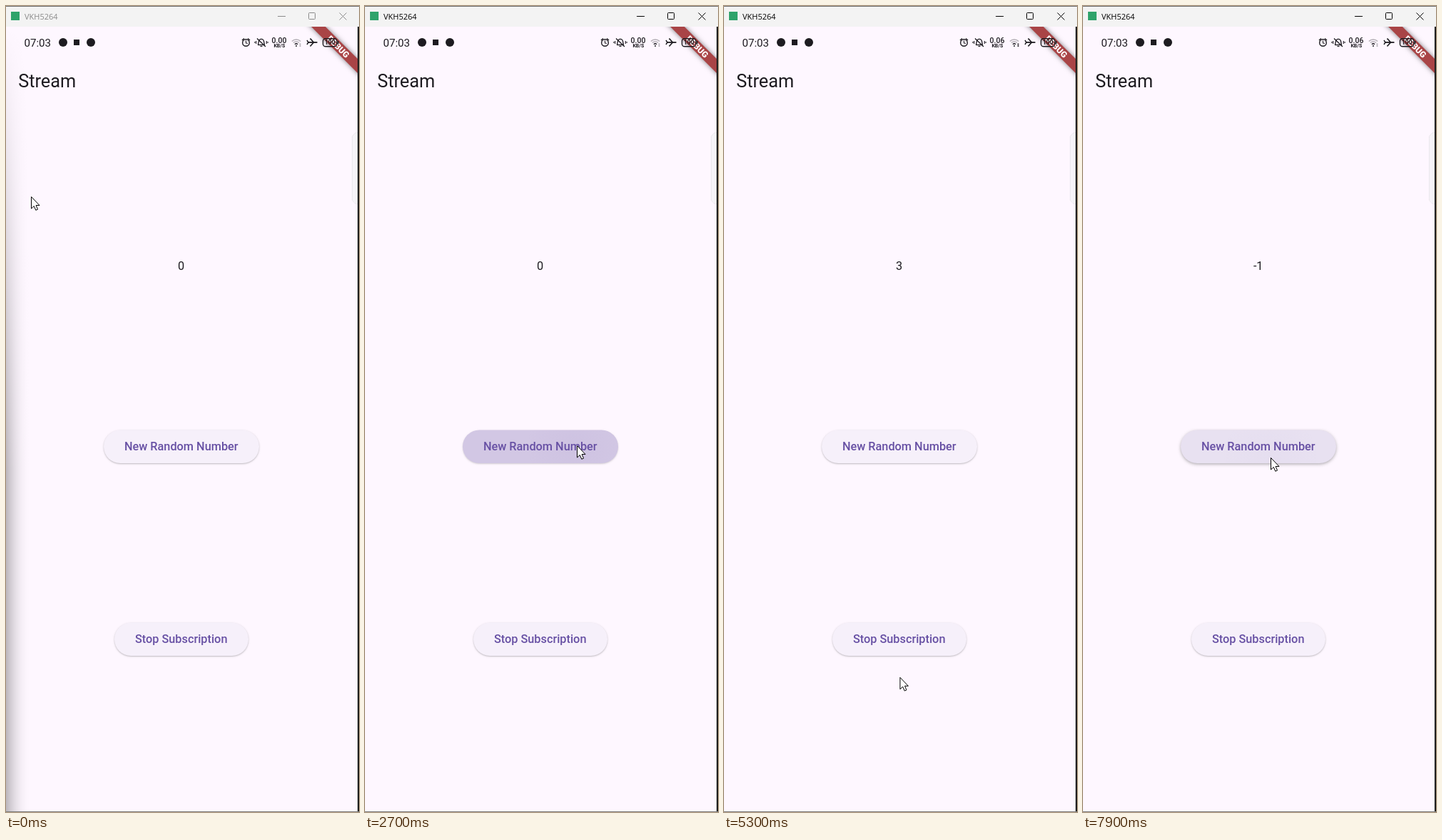
Recreate the animation shown at these times as an HTML page with a canvas. Size 495 px wide and 1130 px high, loop 8 s.

```html
<!DOCTYPE html>
<html lang="en">
<head>
<meta charset="utf-8">
<title>Stream</title>
<style>
  html, body { margin: 0; width: 100%; height: 100%; overflow: hidden; background: #fef7ff; }
  canvas { display: block; width: 495px; height: 1130px; }
</style>
</head>
<body>
<canvas id="stage"></canvas>
<script>
const W = 495, H = 1130, BAR = 29, MID = 245.7;
const LOOP = 8000, STEP = 100, ACTIVATE = 1300;
const INK = '#1d1b20', BG = '#fef7ff', PRIMARY = '103,80,164';
const canvas = document.getElementById('stage');
const dpr = window.devicePixelRatio || 1;
canvas.width = W * dpr;
canvas.height = H * dpr;
const c = canvas.getContext('2d');

// each press is a start and an end time
const buttons = [
  { label: 'New Random Number', y: 594.5, w: 218, presses: [[2300, 2900], [4000, 4700], [7450, 7600]] },
  { label: 'Stop Subscription', y: 864.5, w: 188, presses: [[5700, 6200]] }
];

const clamp = v => Math.max(0, Math.min(1, v));

function glide(t, from, to) {
  const k = clamp((t - from) / (to - from));
  return k * k * (3 - 2 * k);
}

// the second move swings below its goal and comes back
function pointerAt(t) {
  const a = glide(t, 300, 1100), b = glide(t, 4800, 5600), d = glide(t, 6400, 7100);
  return {
    x: 35 + 262 * a - 74 * b + 40 * d,
    y: 267 + 349 * a + 279 * b + 160 * Math.sin(Math.PI * b) - 262 * d
  };
}

function text(str, x, y, font, color = INK, align = 'center') {
  c.font = font + ', sans-serif';
  c.fillStyle = color;
  c.textAlign = align;
  c.fillText(str, x, y);
}

function rect(x, y, w, h, color) {
  c.fillStyle = color;
  c.fillRect(x, y, w, h);
}

function disc(x, y, r, color = INK) {
  c.fillStyle = color;
  c.beginPath();
  c.arc(x, y, r, 0, 7);
  c.fill();
}

function line(x0, y0, x1, y1, width = 1, color = INK) {
  c.strokeStyle = color;
  c.lineWidth = width;
  c.beginPath();
  c.moveTo(x0, y0);
  c.lineTo(x1, y1);
  c.stroke();
}

function arc(x, y, r, a = 0, b = 7, color = INK) {
  c.strokeStyle = color;
  c.lineWidth = 1.4;
  c.beginPath();
  c.arc(x, y, r, a, b);
  c.stroke();
}

function box(x, y, w, h, r, width, color) {
  c.strokeStyle = color;
  c.lineWidth = width;
  c.beginPath();
  c.roundRect(x, y, w, h, r);
  c.stroke();
}

function shadow(alpha, blur, dy = 0) {
  c.shadowColor = `rgba(0,0,0,${alpha})`;
  c.shadowBlur = blur * dpr;
  c.shadowOffsetY = dy * dpr;
}

function edgeShade() {
  const reach = 34;
  for (let x = 0; x < reach; x++) {
    const alpha = .26 * (1 - x / reach) ** 2;
    const g = c.createLinearGradient(0, BAR, 0, 650);
    g.addColorStop(0, 'rgba(0,0,0,0)');
    g.addColorStop(1, `rgba(0,0,0,${alpha})`);
    rect(x, BAR, 1, H - BAR, g);
  }
}

function titleBar(active) {
  const ink = active ? '#000' : '#8a8a8a';
  rect(0, 0, W, BAR, '#f3f3f3');
  rect(0, 0, W, 1, '#707070');
  rect(7, 8, 12, 12, '#2fa36b');
  text('VKH5264', 26, 19, '11px "Open Sans"', ink, 'left');
  line(381, 14.5, 392, 14.5, 1, ink);
  box(424.5, 9.5, 9, 9, 1, 1, ink);
  for (const s of [-5, 5]) line(472.5 - s, 9.5, 472.5 + s, 19.5, 1, ink);
}

function banner() {
  c.save();
  c.beginPath();
  c.rect(0, BAR, 493, H);
  c.clip();
  c.translate(494, BAR);
  c.rotate(Math.PI / 4);
  c.save();
  shadow(.5, 7);
  rect(-60, 32.6, 120, 14, '#a94446');
  c.restore();
  text('DEBUG', 0, 43.9, '900 11.9px Roboto', '#fff');
  c.restore();
}

function alarm(x, y) {
  arc(x, y, 4.8);
  line(x, y - 3, x, y + 1);
  line(x, y, x + 2.5, y + 1.5);
  for (const s of [-1, 1]) line(x + 5.5 * s, y - 3.5, x + 2.5 * s, y - 6, 1.4);
}

function mutedBell(x, y) {
  arc(x, y - 1, 3.6, Math.PI, 0);
  line(x - 5, y + 3.5, x + 5, y + 3.5, 1.3);
  line(x - 1.5, y + 5.5, x + 1.5, y + 5.5, 1.3);
  line(x - 6, y - 5.5, x + 6, y + 6, 1.3);
  for (const s of [-1, 1]) {
    line(x + 3.6 * s, y - 1, x + 4.5 * s, y + 3.5, 1.3);
    for (const k of [1, 2]) line(x + (5.5 + 1.8 * k) * s, y - 3 + k, x + (5.5 + 1.8 * k) * s, y + 3 - k, 1.1);
  }
}

function wifi(x, y, busy) {
  const up = -Math.PI / 2;
  for (const r of [9, 6, 3]) arc(x, y, r, up - .75, up + .75, r > 3 ? '#b3aeb5' : INK);
  disc(x, y, 1);
  for (const dy of [-2.5, 0]) disc(x + 5.5, y + dy, 1.1, busy ? INK : '#aaa6ad');
}

function plane(x, y) {
  line(x - 6, y, x + 7.5, y, 1.8);
  for (const s of [-1, 1]) {
    line(x + 2.5, y, x - 2.5, y + 5.5 * s, 1.7);
    line(x - 5, y, x - 7, y + 3 * s, 1.4);
  }
}

function statusBar(t) {
  text('07:03', 25.5, 56.5, '15.1px Roboto', INK, 'left');
  disc(80, 51, 6);
  rect(95, 47, 8, 8, INK);
  disc(119, 51, 6);
  alarm(336.5, 51.5);
  mutedBell(358, 51);
  text(t < 5200 ? '0.00' : '0.06', 383, 51.5, '500 10.5px Roboto');
  text('KB/S', 383.3, 58.3, '700 7px Roboto');
  wifi(407, 56, t >= 4500 && t < 7000);
  plane(429, 51);
  box(444.5, 45.7, 19.5, 11, 3.5, 1.4, INK);
  rect(465, 49, 1.5, 4.5, INK);
  text('100', 454.2, 54.2, '700 8.5px Roboto');
}

function sideHandle() {
  box(485.5, 177.5, 30, 100, 8, 1, '#dedae0');
  c.fillStyle = '#f7f4f9';
  c.fill();
}

function drawButton({ label, y, w, presses }, t, p) {
  const x = 246 - w / 2, h = 46.5;
  const hover = p.x > x && p.x < x + w && p.y > y && p.y < y + h;
  const down = presses.some(([a, z]) => t >= a && t < z);
  c.save();
  if (hover && !down) shadow(.3, 4, 1.6);
  else shadow(down ? .18 : .25, 2.2, 1);
  c.beginPath();
  c.roundRect(x, y, w, h, h / 2);
  c.fillStyle = hover ? '#ebe4f3' : '#f6f0fa';
  c.fill();
  c.restore();

  for (const [a, z] of presses) {
    if (t < a) continue;
    const age = Math.min(t, z) - a;
    const fade = clamp(1 - (t - z) / 400);
    const glow = .1 * clamp(1 - age / 650) * fade;
    c.fillStyle = `rgba(${PRIMARY},${.24 * clamp(age / 500) * fade})`;
    c.fill();
    const g = c.createRadialGradient(p.x, p.y, 0, p.x, p.y, w / 3);
    g.addColorStop(0, `rgba(${PRIMARY},${glow})`);
    g.addColorStop(1, `rgba(${PRIMARY},0)`);
    c.fillStyle = g;
    c.fill();
  }
  text(label, MID, y + 28.6, '500 16.3px Roboto', '#6750a4');
}

const arrow = new Path2D('M0 0V16.5L3.8 13L6.3 18.8L9 17.6L6.6 12H11.5Z');

function drawPointer({ x, y }) {
  c.save();
  c.translate(x + .5, y + .5);
  c.fillStyle = '#fff';
  c.fill(arrow);
  c.strokeStyle = '#000';
  c.lineWidth = 1;
  c.stroke(arrow);
  c.restore();
}

function draw(t) {
  const p = pointerAt(t);
  const active = t >= ACTIVATE;
  c.setTransform(dpr, 0, 0, dpr, 0, 0);
  rect(0, 0, W, H, BG);
  if (!active) edgeShade();
  titleBar(active);
  banner();
  statusBar(t);
  text('Stream', 17.2, 114.3, '25.3px Roboto', INK, 'left');
  sideHandle();
  text(t < 2900 ? '0' : t < 7600 ? '3' : '-1', MID, 370.3, '16.3px Roboto');
  buttons.forEach(b => drawButton(b, t, p));
  rect(493, BAR, 2, H, '#202020');
  rect(0, H - 1, W, 1, '#808080');
  drawPointer(p);
}

const start = performance.now();
function tick() {
  const t = (performance.now() - start) % LOOP;
  draw(Math.floor(t / STEP) * STEP);
  requestAnimationFrame(tick);
}
tick();
</script>
</body>
</html>
```
